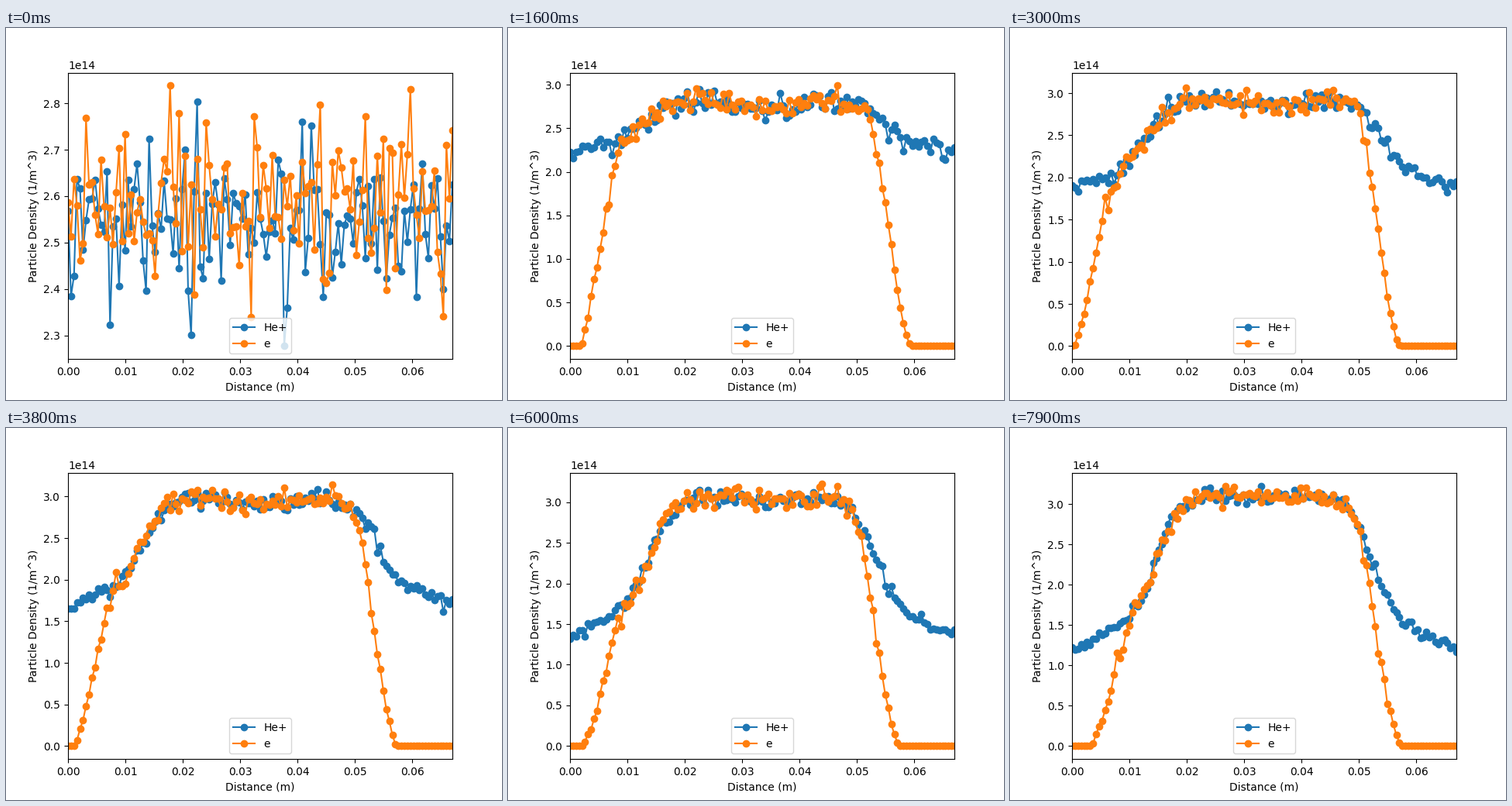
A matplotlib script that plays this animation: 640 px wide and 480 px high, repeating every 8000 ms.

```python
import matplotlib.pyplot as plt
import numpy as np
from matplotlib.animation import FuncAnimation

FRAMES, INTERVAL = 80, 100
LENGTH, CELLS, UNIT = 0.067, 128, 1e14
MEAN = 2.55

x = np.linspace(0, LENGTH, CELLS + 1)
wall = np.minimum(x, LENGTH - x) * 100  # distance to the nearer wall in cm


def loading(seed, low, high, peak_cell):
    """Random initial density spanning low to high, highest at peak_cell."""
    noise = np.random.default_rng(seed).normal(size=x.size)
    noise = np.roll(noise, peak_cell - noise.argmax())
    return np.interp(noise, [noise.min(), noise.max()], [low, high])


ION0 = loading(1, 2.277, 2.803, 43)
ELECTRON0 = loading(2, 2.340, 2.838, 34)


def core_level(k):
    return MEAN + .65 * (1 - np.exp(-k / 45))


def ion_profile(k):
    """Depleted wings rising through a soft step to a core with raised rims."""
    core = core_level(k)
    edge = 1.1 + 1.45 * np.exp(-(k / 42) ** 1.5)
    wing = edge + .16 * (core - edge) * wall
    step = 1 / (1 + np.exp(-(wall - 1.15 - .0045 * k) / .2))
    rim = .13 * np.exp(-k / 60) * np.exp(-((wall - 2.2) / .5) ** 2)
    return wing + (core - wing) * step + rim


def electron_share(k):
    """Electron to ion ratio: a cloud that sways between the walls."""
    sway = (.0057 - .00003 * k) * np.sin(.12 + 2.314 * (k - 9))
    half = .0293 - .000027 * k
    depth = half - np.abs(x - LENGTH / 2 - sway)
    return np.sin(np.pi / 2 * np.clip(depth / .0083, 0, 1)) ** 1.5


def densities(k):
    if k == 0:
        return ION0, ELECTRON0
    rng = np.random.default_rng(100 + k)
    base, share = ion_profile(k), electron_share(k)
    ion = base + (ION0 - MEAN) * np.exp(-k / 30)
    ion += rng.normal(0, .05, x.size) * np.sqrt(base / 2.8)
    electron = base * share + rng.normal(0, .07, x.size) * np.sqrt(share)
    return ion, np.maximum(electron, 0)


def value_range(k):
    if k == 0:
        return ION0.min(), ELECTRON0.max()
    return 0, core_level(k) + .27 - .0016 * k


fig, ax = plt.subplots(figsize=(6.4, 4.8), dpi=100)
lines = [ax.plot(x, x, "o-", label=name)[0] for name in ("He+", "e")]
ax.set_xlim(0, LENGTH)
ax.set_xlabel("Distance (m)")
ax.set_ylabel("Particle Density (1/m^3)")
ax.legend(loc="lower center")


def update(k):
    for line, values in zip(lines, densities(k)):
        line.set_ydata(values * UNIT)
    low, high = value_range(k)
    margin = .05 * (high - low)
    ax.set_ylim((low - margin) * UNIT, (high + margin) * UNIT)
    return lines


anim = FuncAnimation(fig, update, frames=FRAMES, interval=INTERVAL,
                     init_func=lambda: update(0), repeat=True, repeat_delay=0)
plt.show()
```
